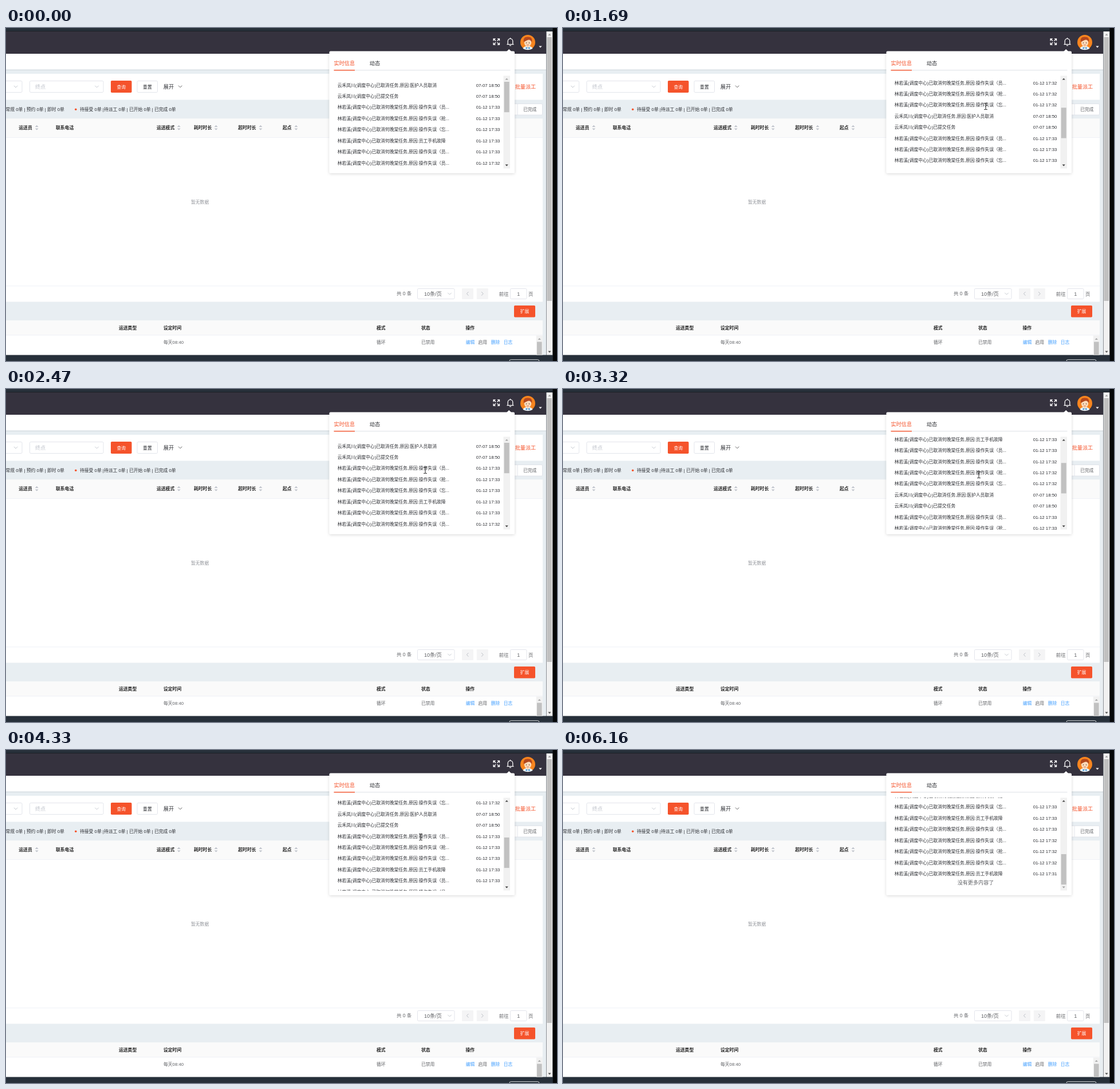
Animation, 962 px wide and 582 px high, one loop 6.82 s. Source, as an HTML page:

```html
<!DOCTYPE html>
<html lang="zh-CN">
<head>
<meta charset="utf-8">
<title>调度中心</title>
<style>
html, body { margin: 0; width: 100%; height: 100%; overflow: hidden; background: #fff; }
svg { display: block; width: 962px; height: 582px; }
text { font-family: "Liberation Sans", "Noto Sans CJK SC", "Noto Sans CJK", sans-serif; white-space: pre; }
</style>
</head>
<body>
<svg id="stage" viewBox="0 0 962 582" xmlns="http://www.w3.org/2000/svg"></svg>
<script>
const LOOP = 6820;
const ORANGE = '#f5532b', GREY = '#606266', DARK = '#2c2e33', LINE = '#dcdfe6', BG = '#e8eef2', BLUE = '#409eff';
const SMALL = 7.8, LARGE = 9.1;

const rect = (x, y, w, h, fill, extra = '') =>
  `<rect x="${x}" y="${y}" width="${w}" height="${h}" fill="${fill}" ${extra}/>`;
const box = (x, y, w, h, fill = '#fff', stroke = LINE) =>
  rect(x + .5, y + .5, w - 1, h - 1, fill, `rx="1.8" stroke="${stroke}" stroke-width=".8"`);
const path = (d, stroke, width = 1, fill = 'none') =>
  `<path d="${d}" fill="${fill}" stroke="${stroke}" stroke-width="${width}"/>`;
const shape = (d, fill, extra = '') => `<path d="${d}" fill="${fill}" ${extra}/>`;
// y is the vertical middle of the line
const text = (s, x, y, fill = DARK, size = SMALL, extra = '') =>
  `<text x="${x}" y="${(y + size * .37).toFixed(2)}" font-size="${size}" fill="${fill}" ${extra}>${s}</text>`;
const mid = (s, x, y, fill, size) => text(s, x, y, fill, size, 'text-anchor="middle"');
const bold = (s, x, y) => text(s, x, y, '#222', SMALL, 'font-weight="700"');
const chevron = (x, y, color = '#c0c4cc') => path(`M${x - 3.2} ${y - 1.7}l3.2 3.2l3.2 -3.2`, color, .9);
const sorter = x => shape(`M${x - 3} 173l3 -3.2l3 3.2zM${x - 3} 175.4l3 3.2l3 -3.2z`, '#c0c4cc');
const up = (x, y, fill, id = '') => shape(`M${x - 2.6} ${y + 1.4}l2.6 -2.8l2.6 2.8z`, fill, id);
const down = (x, y, fill, id = '') => shape(`M${x - 2.6} ${y - 1.4}l2.6 2.8l2.6 -2.8z`, fill, id);

// Notification list
const ROW = 19.42, MAX_SCROLL = 272;
const firm = '云禾岚川(调度中心)已';
const cancel = why => `林若溪(调度中心)已取消何晚棠任务,原因:${why}`;
const slip = c => cancel(`操作失误（${c}...`);
const phone = cancel('员工手机故障');
const batch = [
  [firm + '取消任务,原因:医护人员取消', '07-07 18:50'],
  [firm + '提交任务', '07-07 18:50'],
  [slip('员'), '01-12 17:33'], [slip('抢'), '01-12 17:33'], [slip('忘'), '01-12 17:33'],
  [phone, '01-12 17:33'], [slip('员'), '01-12 17:33'],
  [slip('员'), '01-12 17:32'], [slip('抢'), '01-12 17:32'], [slip('忘'), '01-12 17:32']
];
const news = [...batch, ...batch, [phone, '01-12 17:31']];

function frame() {
  return rect(0, 0, 962, 582, '#27303a') + rect(0, 5, 955, 1, '#1b2026') +
    rect(0, 6, 943, 39, '#35323e') + rect(0, 45, 943, 527, BG) +
    rect(0, 45, 943, 28, '#fff') + rect(0, 72.6, 943, 1.4, '#d3dbe0') +
    rect(0, 80, 937, 45.5, '#fff') + rect(0, 158.5, 937, 320, '#fff') +
    rect(0, 158.5, 937, 32.5, '#fafafa') + rect(0, 191, 937, .8, '#ebeef5') +
    rect(0, 450.5, 937, .8, '#ebeef5') + rect(0, 511, 937, 61, '#fff') +
    rect(0, 511, 937, 26, '#fafafa') + rect(0, 536.5, 937, .8, '#ebeef5') +
    rect(943.5, 6, 11, 566, '#f1f1f1') + rect(944.5, 16, 8.5, 461, '#c1c1c1') +
    up(949, 11.5, '#a3a3a3') + down(949, 566, '#505050') +
    rect(954.5, 0, 7.5, 582, '#050709') + rect(0, 571.5, 954.5, 10.5, '#27303a') +
    path('M879 582q0 -2.4 2.4 -2.4h47q2.4 0 2.4 2.4', '#d5d8da', 1);
}

function header() {
  const corners = [[1, 1], [-1, 1], [1, -1], [-1, -1]].map(([a, b]) =>
    path(`M${856.3 - a * 5.2} ${24 - b * 1.6}v${-b * 3.6}h${a * 3.6}M${856.3 - a * 5} ${24 - b * 5}l${a * 3.8} ${b * 3.8}`, '#fff', 1.3)).join('');
  const bell = path('M874.5 28.6h12M876.2 28.4v-5.2a4.3 4.5 0 0 1 8.6 0v5.2M880.5 18.6v-1.5M879 30.6h3', '#fff', 1.3);
  const avatar = '<circle cx="911" cy="25" r="13" fill="#f7851f"/>' +
    shape('M902.5 36Q904 31.5 911 31.5T919.5 36Q911 40.5 902.5 36z', '#eaf5fc') +
    shape('M908 31h6l-3 4z', '#f5c7a0') +
    '<ellipse cx="911" cy="25.5" rx="6.2" ry="7" fill="#fbd9b8"/>' +
    shape('M904 25Q902 15.5 911 15.5T918 25Q916.5 21 913 20.5Q907 22 904 25z', '#b4481d') +
    '<circle cx="908.5" cy="26" r=".8" fill="#493026"/><circle cx="913.5" cy="26" r=".8" fill="#493026"/>' +
    path('M909 29.3q2 1.5 4 0', '#c45339', .8) +
    shape('M911 35l-3.4 -1.7v3.6zl3.4 -1.7v3.6z', '#3487c9');
  return corners + bell + avatar + shape('M930.3 31.5h5.4l-2.7 2.9z', '#fff');
}

function filters() {
  return box(-20, 92, 48.5, 21) + chevron(17, 102.5) +
    box(41, 92, 129.5, 21) + text('终点', 51, 102.5, '#c0c4cc', LARGE) + chevron(158.5, 102.5) +
    rect(183, 92, 36.5, 21, ORANGE, 'rx="1.8"') + mid('查询', 201.3, 102.7, '#fff') +
    box(228.5, 92, 36.5, 21) + mid('重置', 246.9, 102.7, DARK) +
    text('展开', 274.8, 102.3, DARK, LARGE) + chevron(304.2, 102.3, '#555') +
    text('批量派工', 888.7, 102.3, ORANGE, LARGE) +
    text('常规 0单 | 预约 0单 | 即时 0单', -.6, 141.8) +
    `<circle cx="121.8" cy="142.2" r="1.8" fill="${ORANGE}"/>` +
    text('待接受 0单 |待派工 0单 | 已开始 0单 | 已完成 0单', 129, 141.8) +
    box(860, 132, 77, 20.5) + rect(892.7, 132.5, .8, 19.5, LINE) + text('已完成', 903, 142.4, GREY);
}

function tables() {
  const heads = [['运送员', 22.3], ['联系电话', 87], ['运送模式', 263], ['耗时时长', 328], ['超时时长', 405.3], ['起点', 483]];
  const lower = [['运送类型', 197], ['设定时间', 275], ['模式', 647], ['状态', 725], ['操作', 802.5]];
  const cells = [['每天08:40', 275], ['循环', 647], ['已禁用', 725], ['编辑', 802.7, BLUE], ['启用', 824.5], ['删除', 846.7, BLUE], ['日志', 868.7, BLUE]];
  return heads.map(([s, x]) => bold(s, x, 174.3)).join('') +
    [53.7, 301.8, 366.7, 444.5, 506.5].map(sorter).join('') +
    text('暂无数据', 323, 303.7, '#909399') +
    text('共 0 条', 682, 464.3, GREY, 8.45) +
    box(718, 455, 65.5, 19) + text('10条/页', 730, 464.5, GREY, LARGE) + chevron(774.5, 464.5) +
    rect(796, 455, 20, 19, '#f4f4f5', 'rx="1.3"') + path('M807.4 461.2l-3 3.2l3 3.2', '#b4b8bf', .9) +
    rect(821.8, 455, 20, 19, '#f4f4f5', 'rx="1.3"') + path('M830.2 461.2l3 3.2l-3 3.2', '#b4b8bf', .9) +
    text('前往', 860.8, 464.5, GREY, 8.45) + box(880, 455, 29.5, 19) + mid('1', 894.7, 464.6, GREY, LARGE) +
    text('页', 912, 464.5, GREY, 8.45) +
    rect(887, 485, 37, 20.5, ORANGE, 'rx="1.8"') + mid('扩展', 905.6, 495.5, '#fff') +
    lower.map(([s, x]) => bold(s, x, 523.7)).join('') +
    cells.map(([s, x, c = GREY]) => text(s, x, 549.2, c)).join('') +
    rect(925.8, 537.5, 11, 34, '#f1f1f1') + up(931.3, 543.3, '#a3a3a3') + rect(927, 548.5, 8.6, 23, '#c1c1c1');
}

function panel() {
  const rows = news.map(([s, when], i) => {
    const y = 99.7 + i * ROW;
    return text(s, 578.7, y) + text(when, 820.7, y);
  }).join('');
  return rect(564.5, 40.5, 323.5, 213, '#fff', 'rx="2" filter="url(#shade)"') +
    shape('M874 41l4.2 -4l4.2 4z', '#fff') +
    text('实时信息', 572.6, 62, ORANGE, LARGE) + text('动态', 634.8, 62, DARK, LARGE) +
    rect(572.5, 73.2, 308, 1.1, '#e0e3e9') + rect(572.5, 73, 36.5, 1.4, ORANGE) +
    `<g clip-path="url(#view)"><g id="list">${rows}${mid('没有更多内容了', 720.5, 232 + MAX_SCROLL, GREY, LARGE)}</g></g>` +
    rect(868.5, 83.5, 11.5, 162, '#f1f1f1') +
    up(874.2, 89.2, '#505050', 'id="arrowUp"') + down(874.2, 240, '#505050', 'id="arrowDown"') +
    rect(869.7, 94, 9, 53.2, '#c1c1c1', 'id="thumb"');
}

const pointers =
  `<g id="arrow">${path('M.5 .5v10.6l2.5 -2.3l1.7 3.8l1.6 -.7l-1.7 -3.7h3.3z', '#222', .8, '#fff')}</g>` +
  `<g id="beam">${path('M-2.8 -5.5h2l.8 .7l.8 -.7h2M0 -5V5M-2.8 5.5h2l.8 -.7l.8 .7h2', '#222', 1)}</g>`;

document.getElementById('stage').innerHTML =
  `<defs><clipPath id="view">${rect(572, 83, 296, 163, '#000')}</clipPath>
  <filter id="shade" x="-5%" y="-5%" width="110%" height="112%"><feDropShadow dx="0" dy="1.3" stdDeviation="2.6" flood-color="#000" flood-opacity=".16"/></filter></defs>` +
  frame() + header() + filters() + tables() + panel() + pointers;

// [time, scroll offset]
const scrolls = [
  [0, 0], [1360, 13], [1420, 58], [1490, 108], [1550, 127],
  [1690, 140], [1750, 185], [1820, 235], [1870, 254], [2130, 272],
  [2200, 250], [2260, 182], [2330, 95], [2400, 25], [2470, 0],
  [3200, 13], [3260, 55], [3320, 109], [3400, 215], [3460, 272],
  [4330, 182], [4390, 130], [4460, 75], [4530, 28], [4600, 6], [4660, 0],
  [5060, 9.2], [5130, 75], [5200, 165], [5270, 245], [5340, 272]
];

// [time, x, y, pointer]
const moves = [
  [0, 0, 0, ''],
  [340, 885, 512, 'arrow'], [400, 879, 480, 'arrow'], [470, 867, 432, 'arrow'], [540, 850, 372, 'arrow'],
  [610, 828, 310, 'arrow'], [670, 801, 252, 'arrow'], [740, 774, 203, 'beam'], [810, 750, 168, 'beam'],
  [940, 732, 142, 'beam'], [1010, 738, 138, 'beam'], [1080, 738, 137, 'beam'],
  [2130, 730, 136, 'beam'], [2470, 732, 142, 'beam'], [2610, 732, 148, 'beam'], [2670, 732, 152, 'beam'],
  [3200, 726, 150, 'beam'], [3720, 724, 155, 'beam'], [4120, 724, 152, 'beam'],
  [4990, 723, 150, 'arrow'], [5550, 726, 160, 'arrow'], [5610, 738, 186, 'arrow'], [5680, 760, 226, 'arrow'],
  [5750, 790, 276, 'arrow'], [5820, 825, 332, 'arrow'], [5880, 859, 390, 'arrow'], [5950, 888, 440, 'arrow'],
  [6020, 908, 474, 'arrow'], [6090, 919, 493, 'arrow'], [6160, 0, 0, '']
];

const el = id => document.getElementById(id);
const list = el('list'), thumb = el('thumb'), arrowUp = el('arrowUp'), arrowDown = el('arrowDown');
const cursors = { arrow: el('arrow'), beam: el('beam') };
const at = (steps, t) => steps.findLast(s => s[0] <= t);

function draw(t) {
  const y = at(scrolls, t)[1];
  list.setAttribute('transform', `translate(0 ${-y})`);
  thumb.setAttribute('y', 94 + y / MAX_SCROLL * 88);
  arrowUp.setAttribute('fill', y > 0 ? '#404040' : '#a3a3a3');
  arrowDown.setAttribute('fill', y < MAX_SCROLL ? '#404040' : '#a3a3a3');
  const [, cx, cy, kind] = at(moves, t);
  for (const name in cursors) {
    cursors[name].setAttribute('visibility', name === kind ? 'visible' : 'hidden');
    cursors[name].setAttribute('transform', `translate(${cx} ${cy})`);
  }
}

const start = performance.now();
function tick() {
  draw((performance.now() - start) % LOOP);
  requestAnimationFrame(tick);
}
tick();
</script>
</body>
</html>
```
